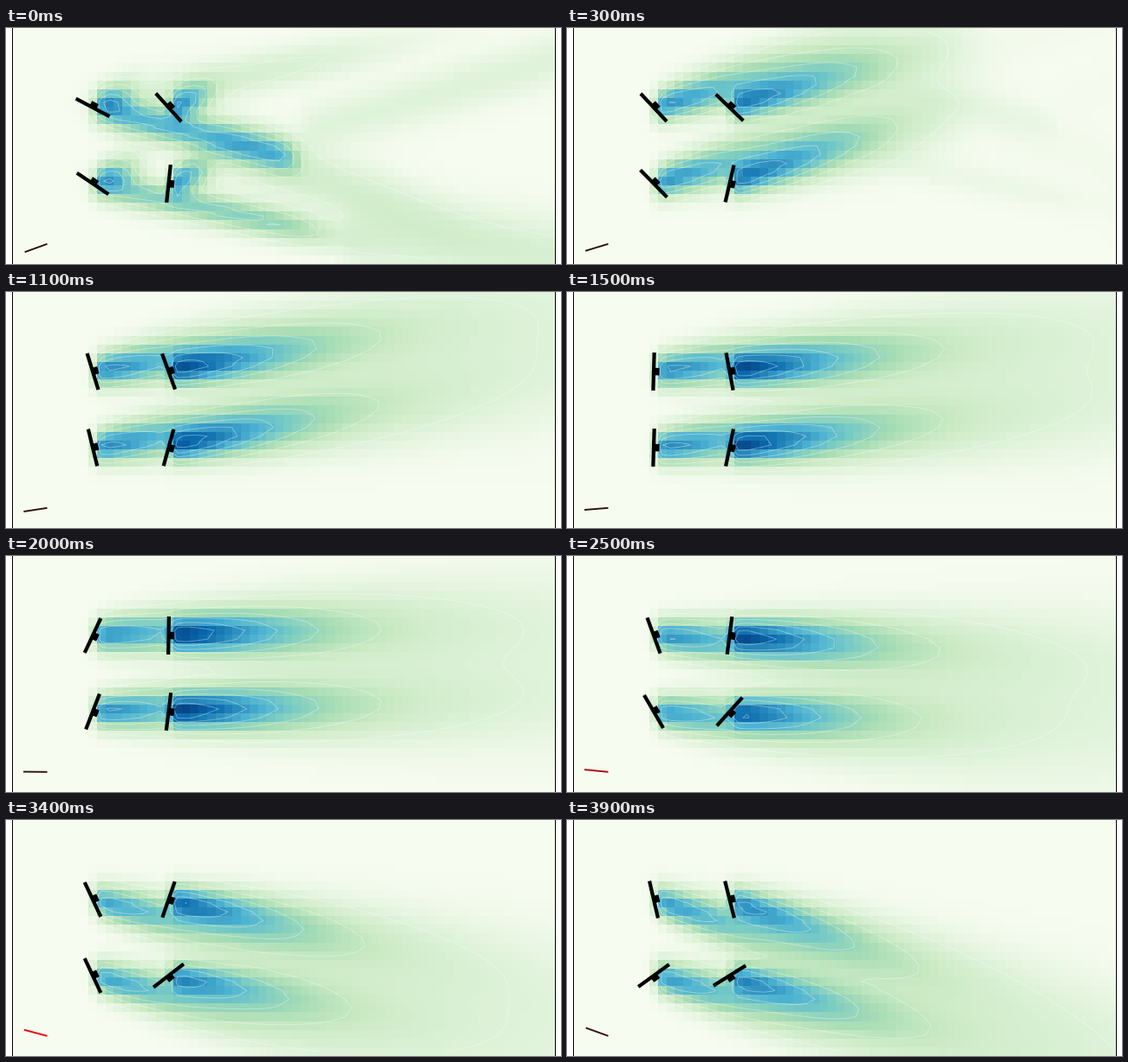
A matplotlib script that plays this animation: 640x273 px, repeating every 4000 ms.

```python
import numpy as np
import matplotlib.pyplot as plt
from matplotlib.animation import FuncAnimation

W, H, DPI, FRAMES = 640, 273, 100, 40
PX = 72 / DPI
LEFT, RIGHT = 7.2, 633.2
COLS, ROWS = 64, 27
SPEED = 75          # wake travel in pixels per frame
BLEND = 1.5         # exponent used to combine overlapping wakes

# Rotor position and (frame, tilt in degrees) waypoints.
TURBINES = [
    ((100, 92), [(0, -62), (6, -24), (11, -17), (20, 25), (25, -20),
                 (34, -25), (39, -13)]),
    ((187.5, 92), [(0, -42), (6, -50), (11, -20), (20, 1), (34, 19),
                   (39, -14)]),
    ((100, 180), [(0, -56), (20, 21), (25, -30), (34, -25), (39, 54)]),
    ((187.5, 180), [(0, 6), (6, 20), (20, 7), (25, 42), (39, 58)]),
]

dx, dy = (RIGHT - LEFT) / COLS, H / ROWS
X, Y = np.meshgrid(LEFT + dx * (np.arange(COLS) + .5),
                   dy * (np.arange(ROWS) + .5))


def tilt_at(points, i):
    return np.radians(np.interp(i, *zip(*points)))


def wind_at(i):
    return np.radians(20 - 40 * i / (FRAMES - 1))


def step(v, width):
    return 1 / (1 + np.exp(-np.clip(v / width, -50, 50)))


def bell(v, sigma):
    return np.exp(-.5 * (v / sigma) ** 2)


def combine(parts):
    return sum(p ** BLEND for p in parts) ** (1 / BLEND)


def wake(pos, tilt, i):
    """Speed deficit behind one rotor, steered by wind and yaw error."""
    wind = wind_at(i)
    yaw = tilt + wind
    slope = .9 * np.tan(wind) + .03 + .06 * np.sin(yaw)
    depth = .77 * np.sqrt(np.cos(yaw))
    d = X - pos[0]
    ahead = np.maximum(d, 0)
    shape = bell(Y - pos[1] + slope * d, 13.5 + .07 * ahead)
    decay = depth / (1 + (ahead / 150) ** 1.9)
    front = step(45 + SPEED * i - d, 12 + 4 * i)
    return decay * shape * step(d - 2, 3.2) * front


def trail(i, start, slope, level, sigma, end=900, soft=8):
    """Leftover wake that drifts downstream and fades."""
    x = X - SPEED * i
    y = Y + 12 * i
    d = x - start[0]
    shape = bell(y - start[1] + slope * d, sigma)
    return level * .5 ** i * shape * step(d - 10, 8) * step(end - x, soft)


def flow(i):
    parts = [wake(pos, tilt_at(points, i), i) for pos, points in TURBINES]
    parts += [
        trail(i, (100, 92), -.25, .60, 16, 335),
        trail(i, (100, 180), -.215, .47, 14, 370, 25),
        trail(i, (150, 82), .21, .20, 17, 420, 60),
        trail(i, (330, 125), .29, .13, 22),
        trail(i, (230, 130), -.35, .22, 26, 520, 60),
        trail(i, (380, 235), -.10, .17, 30),
    ]
    return np.clip(combine(parts), 0, 1)


fig = plt.figure(figsize=(W / DPI, H / DPI), dpi=DPI, facecolor="white")
ax = fig.add_axes([0, 0, 1, 1])
ax.set_xlim(0, W)
ax.set_ylim(H, 0)
ax.axis("off")

field = ax.imshow(np.zeros((ROWS, COLS)), cmap="GnBu", vmin=0, vmax=1,
                  extent=(LEFT, RIGHT, H, 0), interpolation="nearest",
                  aspect="auto", zorder=1)
for edge in (LEFT, RIGHT):
    ax.plot([edge, edge], [0, H], color="black", lw=PX, zorder=5)


def bar(width, **kw):
    return ax.plot([], [], lw=width * PX, solid_capstyle="butt", **kw)[0]


rotors = [bar(4.2, color="black", zorder=4) for _ in TURBINES]
hubs = [bar(8.5, color="black", zorder=4) for _ in TURBINES]
arrow = bar(1.9, zorder=4)
lines = []


def draw(i):
    values = flow(i)
    field.set_data(values)
    while lines:
        lines.pop().remove()
    lines.append(ax.contour(X, Y, values, levels=.14 * np.arange(1, 7),
                            colors="white", alpha=.38, linewidths=.9 * PX,
                            zorder=2))

    for ((x, y), points), rotor, hub in zip(TURBINES, rotors, hubs):
        tilt = tilt_at(points, i)
        c, s = np.cos(tilt), np.sin(tilt)
        rotor.set_data([x - 22 * s, x + 22 * s], [y + 22 * c, y - 22 * c])
        hub.set_data([x, x + 6.5 * c], [y, y + 6.5 * s])

    wind = wind_at(i)
    arrow.set_data([47.5 - 27.5 * np.cos(wind), 47.5],
                   [249.8 + 27.5 * np.sin(wind), 249.8])
    # The arrow glows red for a while late in the loop.
    red = .17 + .83 * np.exp(-((i - 30.5) / 6.5) ** 4)
    dim = .07 * (1 - red)
    arrow.set_color((red, dim, dim))


anim = FuncAnimation(fig, draw, frames=FRAMES, interval=100, repeat=True)
plt.show()
```
